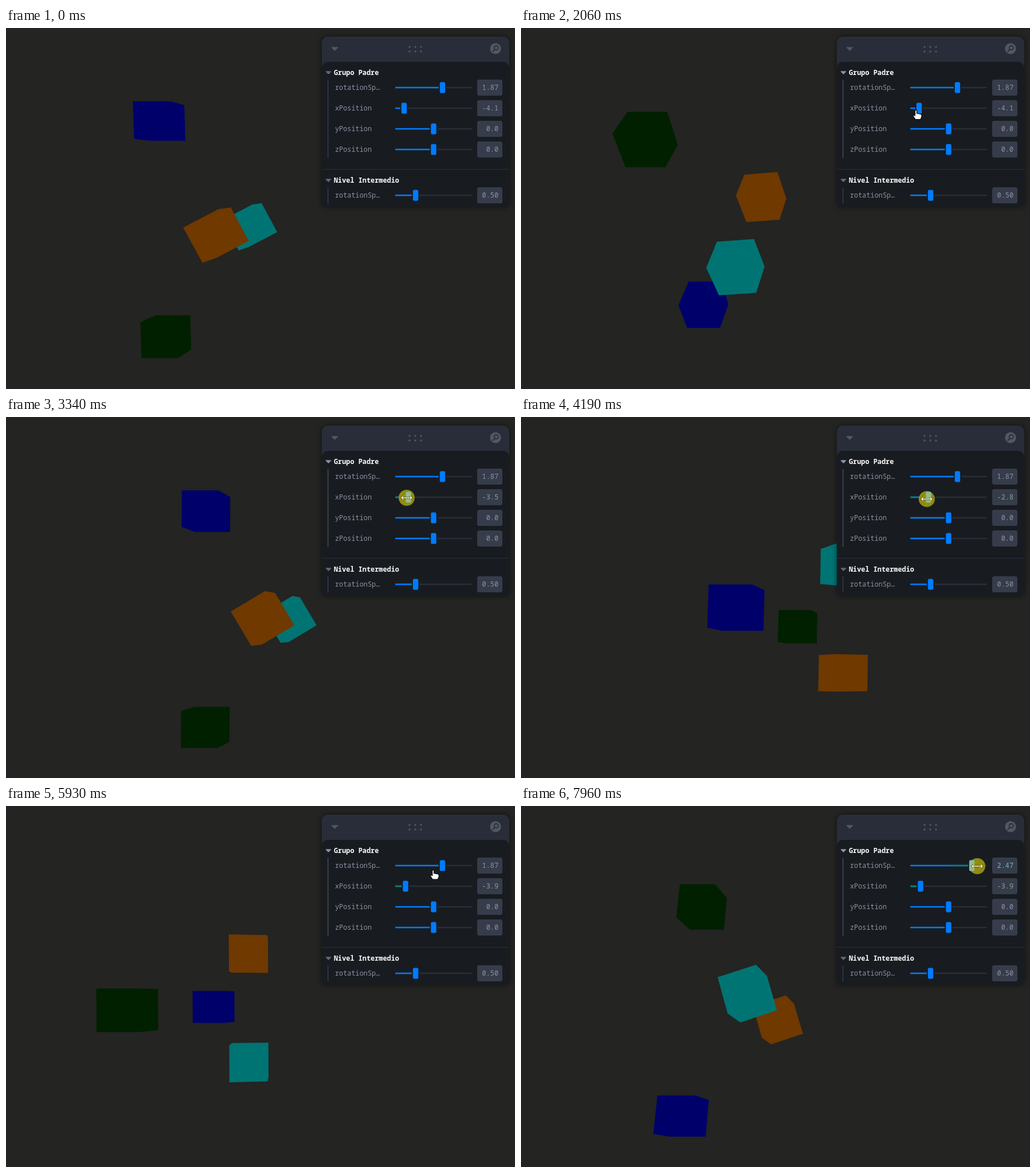
Write an HTML page with a canvas that moves like this. It is 888x630 px and loops after 8000 ms.

```html
<!DOCTYPE html>
<html lang="es">
<head>
<meta charset="utf-8">
<style>
  html, body { margin: 0; width: 100%; height: 100%; overflow: hidden; background: #242422; }
  canvas { display: block; }
</style>
</head>
<body>
<canvas id="stage" width="888" height="630"></canvas>
<script>
const ctx = document.getElementById('stage').getContext('2d');
const FONT = '11.88px "Noto Sans Mono", monospace';
const RAD = Math.PI / 180;
const LOOP = 8000;

// Keyframes: [position, value, value...], linear in between.
const STEPS = [[0, 0], [870, 13], [1710, 25], [3420, 50], [4240, 62], [5050, 74],
  [5860, 86], [6680, 98], [7490, 110], [7960, 117]];
const PARENT_ANGLE = [[0, 4.3], [13, 98.8], [30, 220.5], [49, 359.5], [74, 537.8], [101, 731], [117, 886]];
const PARENT_X = [[31, -4.1], [36, -4.3], [40, -4.2], [49, -3.5], [60, -2.7], [73, -3.9]];
const PARENT_SPEED = [[101, 1.87], [105, 2.55], [112, 2.65], [117, 2.47]];
const POINTER = [[1, 832, 577], [6, 790, 300], [10, 764, 77], [13, 763, 90], [17, 762, 92], [25, 695, 136],
  [30, 689, 143], [36, 689, 142], [49, 699, 141], [60, 709, 143], [74, 693.5, 146], [77, 694, 145],
  [85, 742, 117], [93, 755, 95], [97, 756, 97], [101, 762, 107], [105, 793, 106], [112, 800, 105], [117, 796, 105]];

function track(keys, at) {
  let i = keys.findIndex(key => key[0] > at);
  if (i < 0) return keys[keys.length - 1].slice(1);
  if (i === 0) return keys[0].slice(1);
  const a = keys[i - 1], b = keys[i], k = (at - a[0]) / (b[0] - a[0]);
  return a.slice(1).map((v, j) => v + (b[j + 1] - v) * k);
}

// ---------- cubes ----------
const CAMERA = { x: 787.5, y: 352.7, distance: 10, focal: 1252 };
const CUBES = [
  { color: '#00006b', y: 1.5 },
  { color: '#002000', y: -1.5 },
  { color: '#6f3900', z: 0.75, inner: true },
  { color: '#007473', z: -0.75, inner: true }
];

function hull(points) {
  points.sort((a, b) => a[0] - b[0] || a[1] - b[1]);
  const half = list => {
    const out = [];
    for (const p of list) {
      while (out.length > 1) {
        const [a, b] = out.slice(-2);
        if ((b[0] - a[0]) * (p[1] - a[1]) - (b[1] - a[1]) * (p[0] - a[0]) > 0) break;
        out.pop();
      }
      out.push(p);
    }
    return out.slice(0, -1);
  };
  return [...half(points), ...half([...points].reverse())];
}

function drawCubes(step) {
  const theta = track(PARENT_ANGLE, step)[0] * RAD;
  const phi = (27.3 + 1.91 * step) * RAD;
  const groupX = track(PARENT_X, step)[0];
  const cosT = Math.cos(theta), sinT = Math.sin(theta);
  const cosP = Math.cos(phi), sinP = Math.sin(phi);

  const toWorld = (cube, x, y, z) => {
    if (cube.inner) [x, y] = [1 + x * cosP - y * sinP, x * sinP + y * cosP];
    y += cube.y || 0;
    z += cube.z || 0;
    return [x + groupX, y * cosT - z * sinT, y * sinT + z * cosT];
  };
  const project = ([x, y, z]) => {
    const scale = CAMERA.focal / (CAMERA.distance - z);
    return [CAMERA.x + x * scale, CAMERA.y - y * scale];
  };
  const depth = cube => toWorld(cube, 0, 0, 0)[2];

  for (const cube of [...CUBES].sort((a, b) => depth(a) - depth(b))) {
    const corners = [];
    for (const x of [-0.25, 0.25]) for (const y of [-0.25, 0.25]) for (const z of [-0.25, 0.25])
      corners.push(project(toWorld(cube, x, y, z)));
    ctx.fillStyle = cube.color;
    ctx.beginPath();
    hull(corners).forEach(p => ctx.lineTo(...p));
    ctx.fill();
  }
}

// ---------- panel ----------
function box(x, y, w, h, r, color) {
  ctx.fillStyle = color;
  ctx.beginPath();
  ctx.roundRect(x, y, w, h, r);
  ctx.fill();
}

function disc(x, y, r, color) {
  ctx.fillStyle = color;
  ctx.beginPath();
  ctx.arc(x, y, r, 0, 7);
  ctx.fill();
}

function text(str, x, y, color, align = 'left', weight = '') {
  ctx.font = weight + ' ' + FONT;
  ctx.textAlign = align;
  ctx.fillStyle = color;
  ctx.fillText(str, x, y + 4);
}

function chevron(x, y, r, color) {
  ctx.fillStyle = ctx.strokeStyle = color;
  ctx.lineWidth = 1.5;
  ctx.lineJoin = 'round';
  ctx.beginPath();
  ctx.moveTo(x - r, y - r / 2);
  ctx.lineTo(x + r, y - r / 2);
  ctx.lineTo(x, y + r / 2);
  ctx.closePath();
  ctx.fill();
  ctx.stroke();
}

function folder(title, y, lineEnd, hover) {
  chevron(562.5, y, 4, hover ? '#8c92a4' : '#646872');
  text(title, 572, y, '#fefefe', 'left', 'bold');
  box(561, y + 12.5, 1.4, lineEnd - y - 12.5, 0, hover ? '#4a4f58' : '#373c4b');
}

const handleX = fraction => 683.2 + fraction * 125.6;

function handle(x, y, color) {
  box(x - 6.7, y - 11.5, 13.4, 23, 3, '#181c20');
  box(x - 4.7, y - 9.5, 9.4, 19, 2.5, color);
}

function slider(label, y, fraction, value, { textColor = '#8c92a4', tealFrom = 999 } = {}) {
  const x = handleX(fraction);
  text(label, 574, y, '#8c92a4');
  box(679, y - 1.2, 134, 2.4, 1, '#292d39');
  box(679, y - 1.2, x - 679, 2.4, 1, '#007bff');
  if (tealFrom < x) box(tealFrom, y - 1.2, x - tealFrom, 2.4, 1, '#0a7f74');
  handle(x, y, '#007bff');
  box(822, y - 14, 44, 28, 3.5, '#373c4b');
  text(value, 859, y, textColor, 'right');
}

function drawPanel(step, x, speed) {
  ctx.shadowColor = '#00000088';
  ctx.shadowBlur = 10;
  box(551, 15, 327, 297, [11, 11, 6, 6], '#292d39');
  ctx.shadowBlur = 0;
  box(551, 59, 327, 253, [11, 11, 6, 6], '#181c20');

  chevron(573.5, 36.5, 5, '#535760');
  for (const dx of [704, 714, 724]) for (const dy of [33, 41]) disc(dx, dy, 1.7, '#535760');
  disc(854, 36, 9.6, '#535760');
  ctx.strokeStyle = '#292d39';
  ctx.lineWidth = 1.8;
  ctx.beginPath();
  ctx.arc(855.3, 34.6, 3.6, 0, 7);
  ctx.moveTo(852.7, 37.3);
  ctx.lineTo(848.7, 41.3);
  ctx.stroke();

  folder('Grupo Padre', 78, 227, step >= 9);
  slider('rotationSp…', 104, speed / 3, speed.toFixed(2),
    step > 101 ? { textColor: '#66bdb6', tealFrom: 750 } : {});
  slider('xPosition', 140, (x + 5) / 10, x.toFixed(1),
    step > 31 ? { textColor: '#7fa986', tealFrom: 679 } : {});
  slider('yPosition', 176, 0.5, '0.0');
  slider('zPosition', 212, 0.5, '0.0');
  box(551, 246, 327, 1, 0, '#292d39');
  folder('Nivel Intermedio', 266, 306, false);
  slider('rotationSp…', 292, 0.25, '0.50');
}

// ---------- pointer ----------
const HAND = new Path2D('M-1.5 1Q0-.8 1.5 1V6L9 7.5Q10 8 10 9V12L8 16.5H-1L-5 10.5Q-4.5 8-1.5 10Z');
const ARROW = new Path2D('M0 0V14L3.5 11L6 16L8 15L5.7 10H10Z');
const RESIZE = new Path2D('M-9 0H9M-6-3L-9 0L-6 3M6-3L9 0L6 3');

function drawPointer(step, x, speed) {
  if (step < 1) return;
  const [px, py] = track(POINTER, step);
  const dragX = step > 31 && step < 76;
  const dragSpeed = step > 99;
  if (dragX || dragSpeed) {
    disc(px, py, 14, '#918b10');
    const hx = dragX ? handleX((x + 5) / 10) : handleX(speed / 3);
    box(hx - 4.7, (dragX ? 140 : 104) - 9.5, 9.4, 19, 2.5, 'rgba(143,196,166,.85)');
  }
  ctx.save();
  ctx.translate(px, py);
  if (dragX || dragSpeed) {
    ctx.lineWidth = 3;
    ctx.strokeStyle = '#4a480c';
    ctx.stroke(RESIZE);
    ctx.lineWidth = 1.4;
    ctx.strokeStyle = '#fbf8d0';
    ctx.stroke(RESIZE);
  } else {
    const shape = step < 9 ? ARROW : HAND;
    ctx.lineWidth = 1.2;
    ctx.strokeStyle = '#000';
    ctx.fillStyle = '#fff';
    ctx.fill(shape);
    ctx.stroke(shape);
  }
  ctx.restore();
}

function render() {
  const time = performance.now() % LOOP;
  const step = Math.floor(track(STEPS, time)[0] + 0.2);
  const [x] = track(PARENT_X, step);
  const [speed] = track(PARENT_SPEED, step);
  ctx.fillStyle = '#242422';
  ctx.fillRect(0, 0, 888, 630);
  drawCubes(step);
  drawPanel(step, x, speed);
  drawPointer(step, x, speed);
  requestAnimationFrame(render);
}
render();
</script>
</body>
</html>
```
